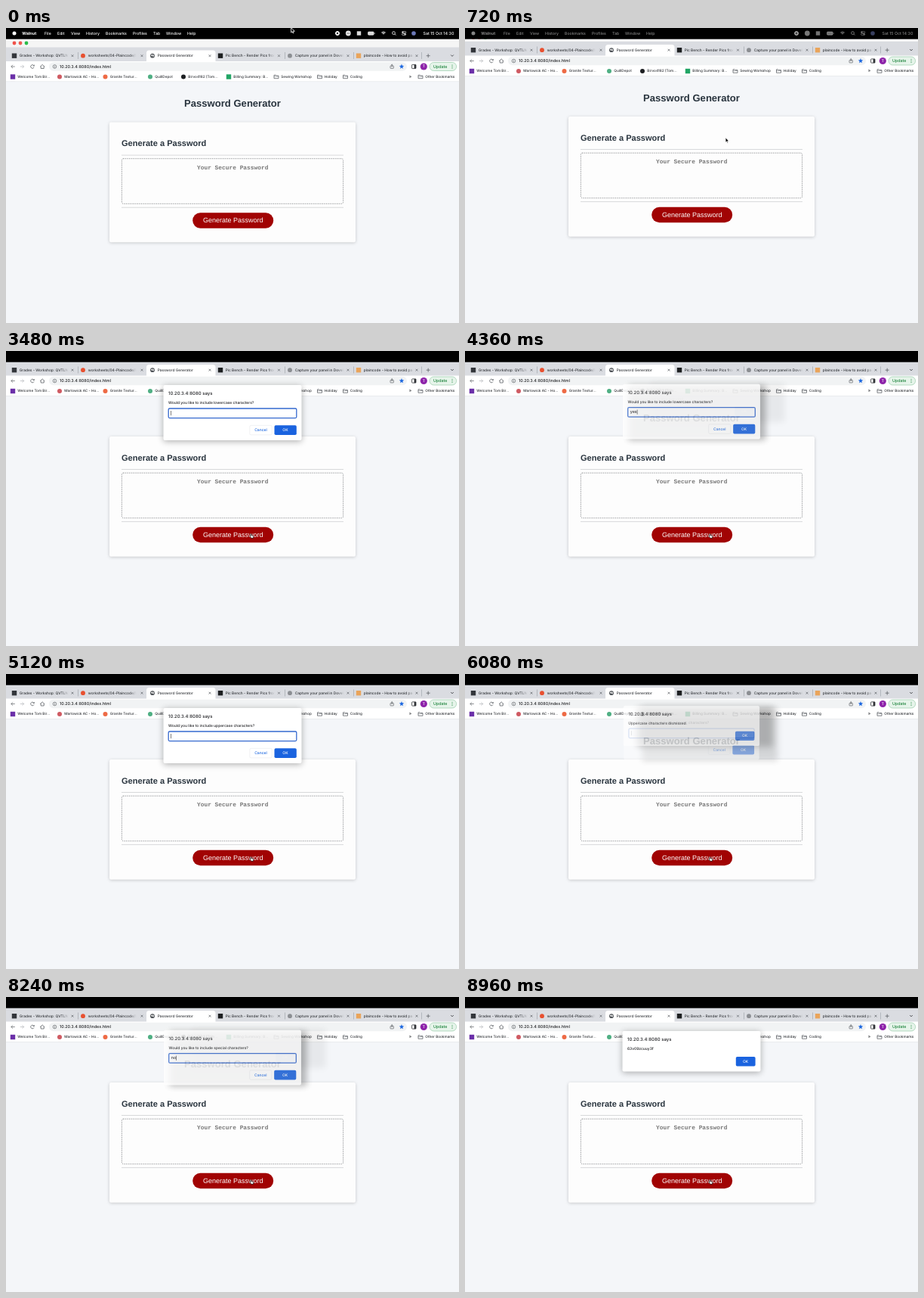
An HTML page with a canvas for the animation above (9 s loop, 600 by 390 pixels).

```html
<!DOCTYPE html>
<html lang="en">
<head>
<meta charset="utf-8">
<title>Password Generator</title>
<style>
  html, body { margin: 0; width: 100%; height: 100%; overflow: hidden; }
  canvas { display: block; width: 600px; height: 390px; }
</style>
</head>
<body>
<canvas id="stage"></canvas>
<script>
const W = 600, H = 390, LOOP = 9000, FADE = 240, BAR = 11.5, MENU = 14.7;
const UI = 'Inter, "Open Sans", sans-serif';
const ARIAL = '"Liberation Sans", Arial, sans-serif';
const MONO = '"Liberation Mono", "Courier New", monospace';
const INK = '#303337', DARK = '#202124', GREY = '#5f6368';
const HOST = '10.20.3.4:8080';
const ratio = window.devicePixelRatio || 1;

function prepare(canvas) {
  canvas.width = W * ratio;
  canvas.height = H * ratio;
  const c = canvas.getContext('2d');
  c.textRendering = 'geometricPrecision';
  c.textBaseline = 'middle';
  return c;
}
const screen = prepare(document.getElementById('stage'));
const layerCanvas = document.createElement('canvas');
const layer = prepare(layerCanvas);
let g = screen;

const clamp = v => Math.max(0, Math.min(1, v));
const ease = v => { v = clamp(v); return v * v * (3 - 2 * v); };

function text(str, x, y, size, color = INK, { weight = 500, family = UI, align = 'left' } = {}) {
  g.font = `${weight} ${size}px ${family}`;
  g.textAlign = align;
  g.fillStyle = color;
  g.fillText(str, x, y);
}
function fadedText(str, x, y, width) {
  const fade = g.createLinearGradient(x + width - 9, 0, x + width, 0);
  fade.addColorStop(0, INK);
  fade.addColorStop(1, 'rgba(48,51,55,0)');
  text(str, x, y, 4.85, fade);
}
function rect(x, y, w, h, color) {
  g.fillStyle = color;
  g.fillRect(x, y, w, h);
}
function round(x, y, w, h, r, fill, stroke, width = 0.5) {
  g.beginPath();
  g.roundRect(x, y, w, h, r);
  if (fill) { g.fillStyle = fill; g.fill(); }
  if (stroke) { g.strokeStyle = stroke; g.lineWidth = width; g.stroke(); }
}
function circle(x, y, r, fill, stroke, width = 0.7) {
  g.beginPath();
  g.arc(x, y, r, 0, 7);
  if (fill) { g.fillStyle = fill; g.fill(); }
  if (stroke) { g.strokeStyle = stroke; g.lineWidth = width; g.stroke(); }
}
const square = (x, y, color, s = 6.4) => rect(x - s / 2, y - s / 2, s, s, color);

// Flat x,y list as one path.
function poly(pts, { fill, stroke = GREY, width = 0.7, close = false } = {}) {
  g.beginPath();
  for (let i = 0; i < pts.length; i += 2) g.lineTo(pts[i], pts[i + 1]);
  if (close) g.closePath();
  if (fill) { g.fillStyle = fill; g.fill(); }
  if (stroke) { g.strokeStyle = stroke; g.lineWidth = width; g.stroke(); }
}
function cross(x, y, r) {
  poly([x - r, y - r, x + r, y + r], { width: 0.75 });
  poly([x - r, y + r, x + r, y - r], { width: 0.75 });
}
function star(x, y, r, color) {
  const pts = [];
  for (let i = 0; i < 10; i++) {
    const a = i * Math.PI / 5 - Math.PI / 2, d = i % 2 ? r * 0.42 : r;
    pts.push(x + d * Math.cos(a), y + d * Math.sin(a));
  }
  poly(pts, { fill: color, stroke: null, close: true });
}
function globe(x, y) {
  circle(x, y, 2.9, '#4d5155');
  poly([x - 2, y - 1, x - 0.2, y - 1.6, x + 0.3, y, x - 0.9, y + 0.9], { fill: '#fff', stroke: null });
  poly([x + 0.8, y - 2, x + 2.1, y - 0.5, x + 1.2, y + 1.6, x + 0.5, y + 0.4], { fill: '#fff', stroke: null });
}
function folder(x, y) {
  poly([x - 3, y + 2.2, x - 3, y - 2.2, x - 0.7, y - 2.2, x, y - 1.4, x + 3, y - 1.4, x + 3, y + 2.2],
    { close: true, width: 0.8 });
  poly([x - 3, y - 0.5, x + 3, y - 0.5], { width: 0.5 });
}

function drawTabs() {
  const y = 25.2;
  rect(0, 14, W, 19, '#dadce1');
  round(186, 18, 91.5, 18, 3.5, '#fff');
  const tabs = [
    [square, '#33363b', 11, 'Grades - Workshop: QVTLN', 65, 88],
    [circle, '#e8502f', 102, 'worksheets/04-Plaincode/02', 64, 180],
    [null, '', 194, 'Password Generator', 66, 270],
    [square, '#1d1f21', 284, 'Pic Bench - Render Pics from', 65, 361.5],
    [circle, '#8b8e92', 376, 'Capture your panel in Dovelin', 65, 453],
    [square, '#e9a45b', 467, 'plaincode - How to avoid pass', 66, 544]
  ];
  for (const [mark, color, x, label, width, closeX] of tabs) {
    if (mark === square) square(x, y, color);
    else if (mark === circle) circle(x, y, 2.9, color);
    else globe(x, y);
    fadedText(label, x + 6.7, y, width);
    cross(closeX, y, 1.4);
  }
  for (const x of [95, 369, 460, 550]) rect(x, 20.5, 0.6, 9, '#9a9ea5');
  poly([556.7, y, 561.7, y], { width: 0.8 });
  poly([559.2, y - 2.5, 559.2, y + 2.5], { width: 0.8 });
  poly([589.2, y - 1.2, 591, y + 0.7, 592.8, y - 1.2], { stroke: INK, width: 0.8 });
}

function drawToolbar() {
  const y = 39.5;
  rect(0, 32.5, W, 27, '#fff');
  poly([9, y - 2.2, 6.8, y, 9, y + 2.2], {});
  poly([6.8, y, 11.8, y], {});
  poly([21.5, y - 2.2, 23.7, y, 21.5, y + 2.2], { stroke: '#b4b7bb' });
  poly([18.8, y, 23.7, y], { stroke: '#b4b7bb' });
  g.beginPath();
  g.arc(35, y, 2.3, 0.4, 5.5);
  g.strokeStyle = GREY; g.lineWidth = 0.8; g.stroke();
  poly([37.7, y - 2.7, 37.7, y - 0.4, 35.4, y - 0.4], { fill: GREY, stroke: null });
  poly([45.2, y + 0.2, 48.2, y - 2.6, 51.2, y + 0.2], { width: 0.8 });
  poly([46.2, y - 0.5, 46.2, y + 2.5, 50.2, y + 2.5, 50.2, y - 0.5], { width: 0.8 });

  round(57, 33.8, 474, 11.4, 5.7, '#f1f3f4');
  circle(64.5, y, 2.3, null, GREY, 0.7);
  rect(64.2, y - 0.3, 0.7, 1.6, GREY);
  rect(64.2, y - 1.3, 0.7, 0.6, GREY);
  text(HOST + '/index.html', 71, y, 5.4, DARK);
  round(509, y - 1, 4.4, 3.4, 0.5, null, GREY, 0.7);
  poly([511.2, y + 0.7, 511.2, y - 2.8], {});
  poly([509.9, y - 1.8, 511.2, y - 3, 512.5, y - 1.8], { width: 0.6 });
  star(524, y, 3.4, '#1a66e0');
  round(537.6, y - 2.6, 5.4, 5.2, 0.6, null, INK, 0.8);
  rect(540.6, y - 2.6, 2.4, 5.2, INK);
  circle(553.3, y, 4.6, '#8e24aa');
  text('T', 553.3, y, 4.8, '#fff', { align: 'center' });
  round(561, 34, 35.6, 11, 5.5, '#e6f4ea', '#8cc5a0', 0.6);
  text('Update', 566, y, 5.3, '#188038');
  for (const dy of [-2, 0, 2]) circle(591, y + dy, 0.55, '#188038');
}

function drawBookmarks() {
  const y = 53;
  const items = [
    [square, '#6b2fa8', 9, 'Welcome Tom Bir...'],
    [circle, '#cf5a62', 71, 'Marlowick AC - Ho...'],
    [circle, '#ee6a45', 131.5, 'Granite Textur...'],
    [circle, '#4faf83', 191, 'QuillDepot'],
    [circle, '#1d1f22', 235, 'Birvo4182 (Tom...'],
    [square, '#22a565', 295, 'Billing Summary: B...'],
    [folder, '', 358, 'Sewing Workshop'],
    [folder, '', 415.5, 'Holiday'],
    [folder, '', 449.5, 'Coding'],
    [folder, '', 549, 'Other Bookmarks']
  ];
  for (const [mark, color, x, label] of items) {
    if (mark === circle) circle(x, y, 3, color);
    else mark(x, y, color);
    text(label, x + 6.3, y, 4.7);
  }
  text('»', 535.5, y - 0.2, 5.5, INK, { align: 'center' });
  rect(0, 59, W, 0.6, '#e1e3e6');
}

function drawPage() {
  const slate = '#29343e';
  rect(0, 59, W, H, '#f4f6f9');
  text('Password Generator', 300, 89.3, 13.07, slate, { weight: 700, family: ARIAL, align: 'center' });
  g.save();
  g.shadowColor = 'rgba(0,0,0,0.2)';
  g.shadowBlur = 4 * ratio;
  g.shadowOffsetY = 0.9 * ratio;
  round(137, 113, 326, 158.7, 2, '#fdfdfd');
  g.restore();
  text('Generate a Password', 153, 141.6, 11.06, slate, { weight: 700, family: ARIAL });
  rect(153, 156.2, 294, 0.8, '#cfd1d3');
  rect(153, 225.3, 294, 0.8, '#cfd1d3');
  g.setLineDash([1.25, 1.25]);
  round(153.4, 161.2, 293.2, 59.6, 2, null, '#74777a', 0.8);
  g.setLineDash([]);
  text('Your Secure Password', 300.2, 173.4, 7.87, '#777', { weight: 700, family: MONO, align: 'center' });
  round(247.2, 232.8, 107, 20.4, 10.2, '#a10303');
  text('Generate Password', 300.8, 243.4, 9, '#fff', { weight: 400, family: ARIAL, align: 'center' });
}

function drawMenuBar(alpha) {
  rect(0, 0, W, MENU, '#000');
  if (alpha <= 0) return;
  const y = 7;
  g.globalAlpha = alpha;
  circle(11, y, 2.5, '#fff');
  text('Walnut', 21.3, y, 5.5, '#fff', { weight: 700 });
  const menus = [['File', 51], ['Edit', 68], ['View', 86], ['History', 106], ['Bookmarks', 132],
    ['Profiles', 168], ['Tab', 195], ['Window', 212], ['Help', 240]];
  for (const [label, x] of menus) text(label, x, y, 5.2, '#fff');
  circle(439, y, 2.5, '#fff', '#fff', 1);
  circle(439, y, 1.2, '#000');
  circle(453.3, y, 3.4, '#e8e8e8');
  rect(451.2, y - 0.4, 4.2, 0.9, '#777');
  square(467.5, y, '#dedede', 5.4);
  round(479.5, y - 2, 7.6, 4.2, 1, '#d8d8d8', '#fff', 0.6);
  rect(487.8, y - 0.7, 0.7, 1.5, '#fff');
  for (const r of [1.4, 2.7, 4]) {
    g.beginPath();
    g.arc(500, y + 2, r, -2.35, -0.8);
    g.strokeStyle = '#fff'; g.lineWidth = 0.8; g.stroke();
  }
  circle(513.5, y - 0.4, 1.9, null, '#fff', 0.8);
  poly([514.9, y + 1, 516.4, y + 2.5], { stroke: '#fff', width: 0.8 });
  for (const dy of [-1.4, 1.4]) {
    round(524.4, y + dy - 1, 5.4, 2, 1, null, '#fff', 0.6);
    circle(527 + dy, y + dy, 0.8, '#fff');
  }
  circle(540, y, 2.8, '#6c79b8');
  text('Sat 15 Oct 14:30', 593.3, y, 5.3, '#fff', { align: 'right' });
  g.globalAlpha = 1;
}

function drawBrowser(shift, menuAlpha) {
  rect(0, 0, W, H, '#f4f6f9');
  g.save();
  g.translate(0, shift);
  drawPage();
  rect(0, 2, W, 12.5, '#f5f5f5');
  ['#f0524a', '#ee5b50', '#2bbd49'].forEach((c, i) => circle(11 + i * 8, 8.5, 2.4, c));
  drawTabs();
  drawToolbar();
  drawBookmarks();
  g.restore();
  drawMenuBar(menuAlpha);
}

// Dialogs in order; keys are the times at which the answer's letters appear.
const ask = kind => `Would you like to include ${kind} characters?`;
const dialogs = [
  { at: 1460, msg: 'how long do you want the password to be?', answer: '12', keys: [2320, 2360] },
  { at: 2840, msg: 'Password length selected.' },
  { at: 3160, msg: ask('lowercase'), answer: 'yes', keys: [3680, 3800, 3960] },
  { at: 4320, msg: 'Lowercase characters selected.' },
  { at: 4640, msg: ask('uppercase'), answer: 'no', keys: [5280, 5400] },
  { at: 5640, msg: 'Uppercase characters dismissed.' },
  { at: 5980, msg: ask('numeric'), answer: 'yes', keys: [6440, 6560, 6720] },
  { at: 6960, msg: 'Numeric characters selected.' },
  { at: 7170, msg: ask('special'), answer: 'no', keys: [7880, 8040] },
  { at: 8200, msg: 'Special characters dismissed.' },
  { at: 8560, msg: '63v09zcuuy3f' }
];
const dialogHeight = d => d.keys ? 73 : 53.5;

// Only the shadow lands on the stage; its caster stays off to the left.
function paintShadow(d) {
  g.save();
  g.shadowColor = 'rgba(0,0,0,0.32)';
  g.shadowBlur = 8 * ratio;
  g.shadowOffsetX = 2 * W * ratio;
  g.shadowOffsetY = 1.5 * ratio;
  round(208.5 - 2 * W, 45, 183, dialogHeight(d), 2, '#000');
  g.restore();
}

function paintDialog(d, t) {
  round(208.5, 45, 183, dialogHeight(d), 2, '#fff');
  text(HOST + ' says', 215, 56.5, 6, DARK);
  text(d.msg, 215, 68.5, 4.95, DARK);
  const mid = { align: 'center' };
  if (!d.keys) {
    round(358.8, 79, 25.8, 12.6, 1.8, '#1a63df');
    text('OK', 371.6, 85.4, 5, '#fff', mid);
    return;
  }
  round(215.2, 76, 169.6, 12.6, 1.5, '#fff', '#3569cf', 1.3);
  const typed = d.answer.slice(0, d.keys.filter(k => t >= k).length);
  text(typed, 218.2, 82.2, 5.4, DARK);
  rect(218.3 + g.measureText(typed).width, 79, 0.6, 6.2, DARK);
  round(322.8, 98.3, 29.4, 12.6, 1.8, '#fff', '#e6e8eb', 0.6);
  text('Cancel', 337.5, 104.8, 5, '#1a66e0', mid);
  round(355.5, 98.3, 29.3, 12.8, 1.8, '#1a63df');
  text('OK', 370, 104.8, 5, '#fff', mid);
}

function showDialog(d, t, alpha, rise) {
  if (alpha <= 0) return;
  const hidden = 1 - alpha, scale = 1 - 0.035 * hidden;
  for (const paint of [paintShadow, paintDialog]) {
    g = layer;
    g.setTransform(1, 0, 0, 1, 0, 0);
    g.clearRect(0, 0, layerCanvas.width, layerCanvas.height);
    g.setTransform(ratio, 0, 0, ratio, 0, 0);
    g.translate(300, 82 - rise * hidden);
    g.scale(scale, scale);
    g.translate(-300, -82);
    paint(d, t);
    g = screen;
    g.globalAlpha = alpha;
    g.drawImage(layerCanvas, 0, 0, W, H);
    g.globalAlpha = 1;
  }
}

function drawDialogs(t) {
  const i = dialogs.findLastIndex(d => t >= d.at);
  if (i < 0) return;
  const p = clamp((t - dialogs[i].at) / FADE);
  showDialog(dialogs[i], t, p, 6.8);
  if (i > 0) showDialog(dialogs[i - 1], t, 1 - p, 8);
}

function drawPointer(t) {
  const p = ease((t - 40) / 1200);
  const x = 377.6 + (323.4 - 377.6) * p, y = -0.6 + 242 * p;
  const overButton = y > 233;
  g.save();
  g.translate(x, y);
  g.lineJoin = 'round';
  if (overButton) g.scale(0.85, 0.85);
  const pts = overButton
    ? [0.5, 1, 1.2, 0.3, 1.9, 1, 2, 2.8, 4.8, 3.4, 5.3, 4.2, 4.8, 7, 1.7, 7, -0.7, 4.2, 0, 3.7, 0.8, 4.3]
    : [0, 0, 0, 6.6, 1.5, 5.2, 2.5, 7.5, 3.5, 7, 2.6, 4.9, 4.7, 4.9];
  poly(pts, { fill: overButton ? '#fff' : '#000', stroke: overButton ? '#111' : '#fff', width: 0.8, close: true });
  g.restore();
}

function draw(now) {
  const t = now % LOOP;
  g = screen;
  g.setTransform(ratio, 0, 0, ratio, 0, 0);
  drawBrowser(BAR * (1 - ease((t - 480) / 400)), 1 - clamp((t - 480) / 500));
  drawDialogs(t);
  drawPointer(t);
}

const start = performance.now();
function tick() {
  draw(performance.now() - start);
  requestAnimationFrame(tick);
}
tick();
</script>
</body>
</html>
```
